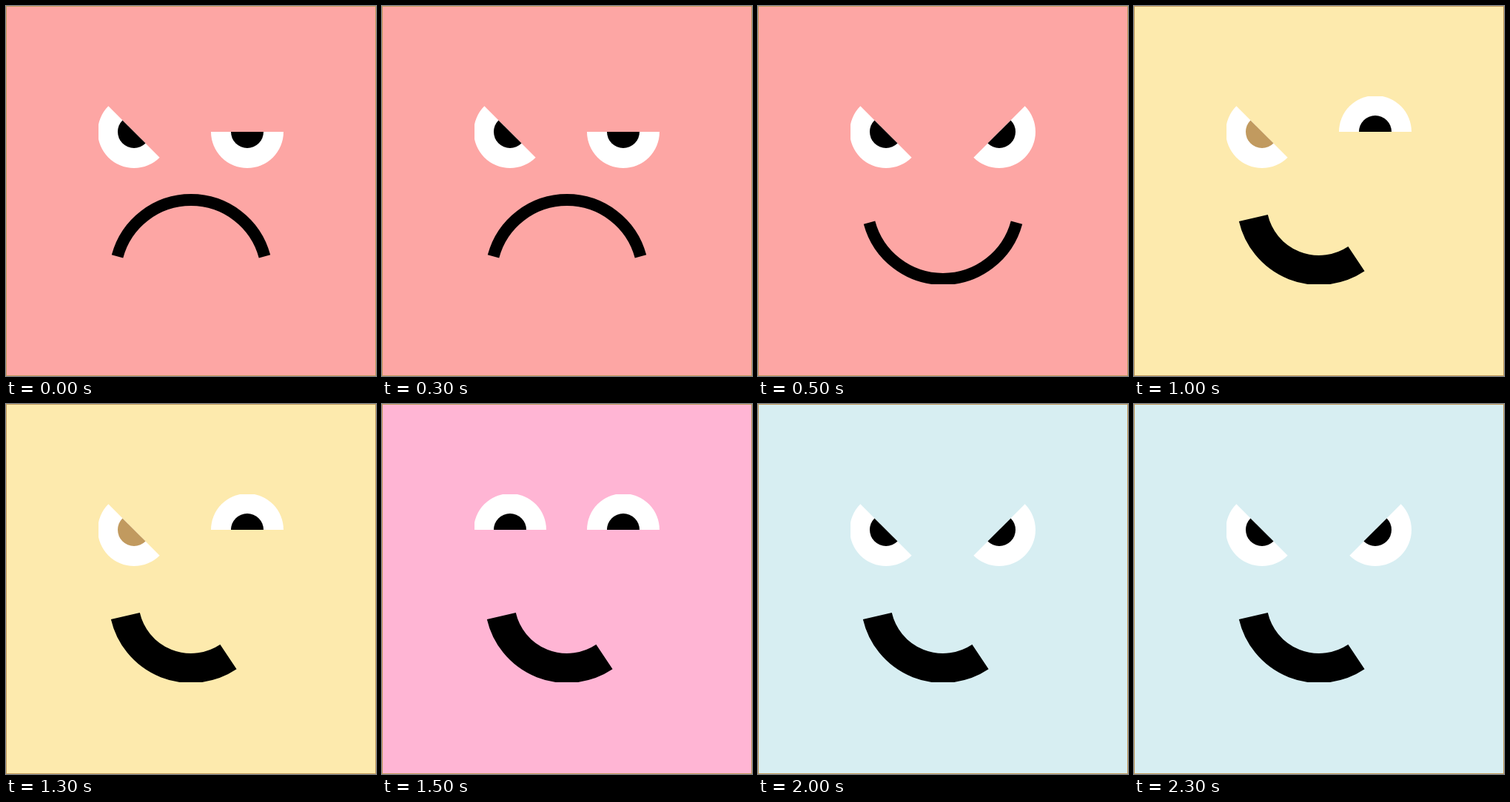
Recreate the animation shown at these times as an HTML page. Size 500 px wide and 500 px high, loop 2.5 s.

```html
<!DOCTYPE html>
<html lang="en">
<head>
<meta charset="utf-8">
<title>Moody face</title>
<style>
  html, body { margin: 0; width: 100%; height: 100%; overflow: hidden; }
  svg { display: block; width: 500px; height: 500px; }
</style>
</head>
<body>
<svg viewBox="0 0 500 500">
  <defs>
    <clipPath id="box"><rect x="125" y="122" width="250" height="254"/></clipPath>
  </defs>
  <rect width="500" height="500" fill="#c19a5b"/>
  <rect id="skin" x="1" y="1" width="498" height="498"/>
  <g clip-path="url(#box)">
    <g id="left">
      <path d="M-49 0A49 49 0 0 0 49 0Z" fill="#fff"/>
      <path class="pupil" d="M-22 0A22 22 0 0 0 22 0Z"/>
    </g>
    <g id="right">
      <path d="M-49 0A49 49 0 0 0 49 0Z" fill="#fff"/>
      <path d="M-22 0A22 22 0 0 0 22 0Z"/>
    </g>
    <path id="mouth" fill="none" stroke="#000"/>
  </g>
</svg>
<script>
const STEP = 500;
const $ = s => document.querySelector(s);
const skin = $('#skin'), left = $('#left'), right = $('#right');
const pupil = $('.pupil'), mouth = $('#mouth');

// Mouth arcs: centre height, radius, stroke width, start and end angle
const frown = { y: 365, r: 103, w: 16, from: 195, to: 345 };
const smile = { y: 266, r: 103, w: 16, from: 165, to: 15 };
const smirk = { y: 266, r: 91, w: 40, from: 167, to: 56.3 };

// Eyelid angles: 0 shows the lower half of the eye, 180 the upper half
const moods = [
  { skin: '#fda6a4', left: 45, right: 0, pupil: '#000', mouth: frown },
  { skin: '#fda6a4', left: 45, right: -45, pupil: '#000', mouth: smile },
  { skin: '#fdeaad', left: 45, right: 180, pupil: '#c19a5f', mouth: smirk },
  { skin: '#ffb5d4', left: 180, right: 180, pupil: '#000', mouth: smirk },
  { skin: '#d7eef2', left: 45, right: -45, pupil: '#000', mouth: smirk }
];

function arc({ y, r, from, to }) {
  const point = deg => {
    const a = deg * Math.PI / 180;
    return `${250 + r * Math.cos(a)} ${y + r * Math.sin(a)}`;
  };
  return `M${point(from)}A${r} ${r} 0 0 ${to > from ? 1 : 0} ${point(to)}`;
}

function show(mood) {
  skin.setAttribute('fill', mood.skin);
  left.setAttribute('transform', `translate(173 170) rotate(${mood.left})`);
  right.setAttribute('transform', `translate(326 170) rotate(${mood.right})`);
  pupil.setAttribute('fill', mood.pupil);
  mouth.setAttribute('d', arc(mood.mouth));
  mouth.setAttribute('stroke-width', mood.mouth.w);
}

const start = performance.now();
let current = -1;

function tick() {
  const elapsed = Math.max(0, performance.now() - start);
  const index = Math.floor(elapsed / STEP) % moods.length;
  if (index !== current) show(moods[current = index]);
  requestAnimationFrame(tick);
}
tick();
</script>
</body>
</html>
```
